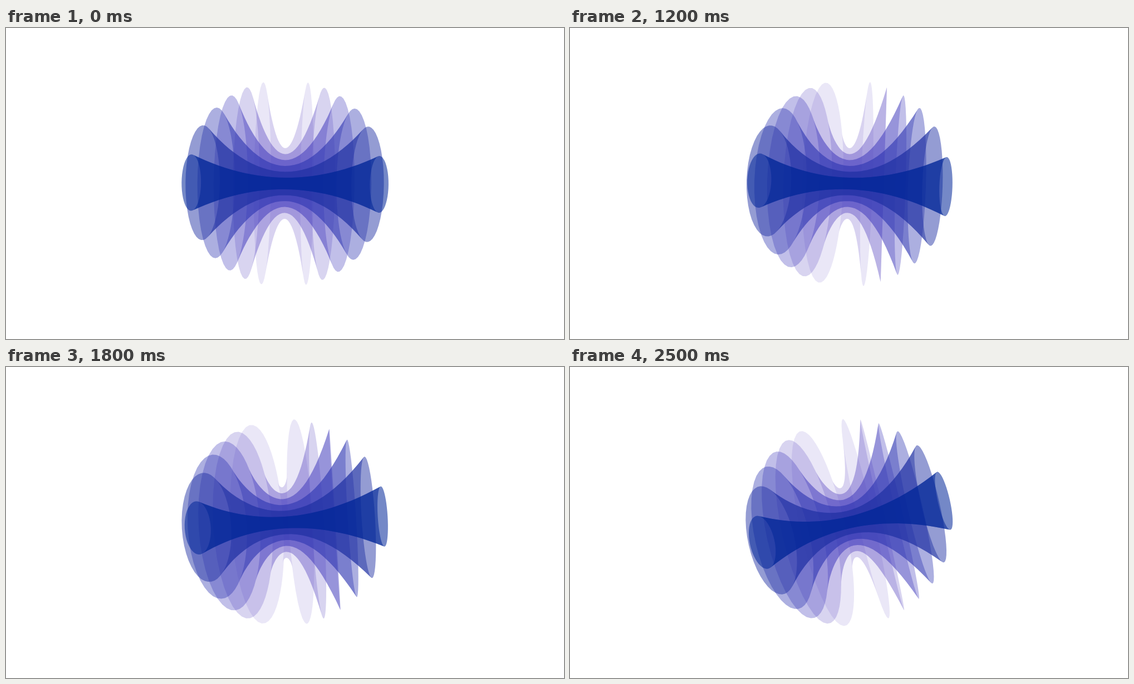
An HTML page with a canvas for the animation above (2.6 s loop, 1002x559 px).

```html
<!DOCTYPE html>
<html lang="en">
<head>
<meta charset="utf-8">
<title>Nested flared tubes</title>
<style>
  html, body { margin: 0; width: 100%; height: 100%; overflow: hidden; background: #fff; }
  canvas { display: block; width: 1002px; height: 559px; }
</style>
</head>
<body>
<canvas id="stage" width="1002" height="559"></canvas>
<script>
const ctx = document.getElementById('stage').getContext('2d');
const CENTER = { x: 501, y: 279.5 };
const CAMERA = 500, RADIUS = 174.5, NECK_STEP = 10.5;
const RINGS = 28, SIDES = 48;
const LOOP = 2600, STEP = 100;

// Outermost tube first; reach is the half length relative to the ball radius.
const TUBES = [
  { reach: .203, color: 'rgba(80,60,190,.12)' },
  { reach: .355, color: 'rgba(78,60,187,.22)' },
  { reach: .507, color: 'rgba(64,58,186,.32)' },
  { reach: .661, color: 'rgba(48,56,178,.40)' },
  { reach: .814, color: 'rgba(32,48,163,.48)' },
  { reach: .957, color: 'rgba(3,39,154,.55)' }
].map((tube, i, all) => ({ ...tube, neck: NECK_STEP * (all.length - i) }));

// Axis pose in degrees: roll in the picture plane, yaw of the right end toward the viewer.
const TIMES = [0, .4, .8, 1.2, 1.6, 2, 2.5];
const ROLL = [.55, 2.55, 3.1, 1.85, -1.25, -6.1, -12.9];
const YAW = [.5, 1.7, 4, 7.1, 9.7, 10.7, 8.2];

function curve(values) {
  const last = TIMES.length - 1;
  const chord = i => (values[i + 1] - values[i]) / (TIMES[i + 1] - TIMES[i]);
  const slopes = values.map((_, i) => {
    if (i === 0 || i === last) return 0;
    const before = TIMES[i] - TIMES[i - 1], after = TIMES[i + 1] - TIMES[i];
    return (chord(i - 1) * after + chord(i) * before) / (before + after);
  });
  slopes[0] = 2 * chord(0) - slopes[1];
  slopes[last] = 2 * chord(last - 1) - slopes[last - 1];

  return t => {
    let i = 0;
    while (i < last - 1 && t > TIMES[i + 1]) i++;
    const span = TIMES[i + 1] - TIMES[i], u = (t - TIMES[i]) / span, v = 1 - u;
    return v * v * (1 + 2 * u) * values[i] + u * u * (1 + 2 * v) * values[i + 1]
      + u * v * span * (v * slopes[i] - u * slopes[i + 1]);
  };
}

const rollAt = curve(ROLL), yawAt = curve(YAW);
const radians = degrees => degrees * Math.PI / 180;

function projector(roll, yaw) {
  const cr = Math.cos(roll), sr = Math.sin(roll);
  const cy = Math.cos(yaw), sy = Math.sin(yaw);
  return (along, up, depth) => {
    const x = along * cy - depth * sy;
    const scale = CAMERA / (CAMERA - along * sy - depth * cy);
    return [
      CENTER.x + (x * cr - up * sr) * scale,
      CENTER.y + (x * sr + up * cr) * scale
    ];
  };
}

function tubeMesh({ reach, neck }, project) {
  const half = reach * RADIUS;
  const rim = RADIUS * Math.sqrt(1 - reach * reach);
  return Array.from({ length: RINGS + 1 }, (_, i) => {
    const s = 2 * i / RINGS - 1;
    const r = neck + (rim - neck) * s * s;
    return Array.from({ length: SIDES }, (_, j) => {
      const a = 2 * Math.PI * j / SIDES;
      return project(half * s, r * Math.cos(a), r * Math.sin(a));
    });
  });
}

// Near and far sheets are separate paths, so each one tints its area once.
function drawTube(tube, project) {
  const mesh = tubeMesh(tube, project);
  const near = new Path2D(), far = new Path2D();
  for (let i = 0; i < RINGS; i++) {
    for (let j = 0; j < SIDES; j++) {
      const k = (j + 1) % SIDES;
      const a = mesh[i][j], b = mesh[i + 1][j], c = mesh[i + 1][k], d = mesh[i][k];
      const area = (c[0] - a[0]) * (d[1] - b[1]) - (c[1] - a[1]) * (d[0] - b[0]);
      const sheet = area > 0 ? near : far;
      sheet.moveTo(...a);
      sheet.lineTo(...b);
      sheet.lineTo(...c);
      sheet.lineTo(...d);
      sheet.closePath();
    }
  }
  ctx.fillStyle = tube.color;
  ctx.fill(far, 'nonzero');
  ctx.fill(near, 'nonzero');
}

function draw(ms) {
  const t = ms / 1000;
  const project = projector(radians(rollAt(t)), radians(yawAt(t)));
  ctx.fillStyle = '#fff';
  ctx.fillRect(0, 0, 1002, 559);
  TUBES.forEach(tube => drawTube(tube, project));
}

const start = performance.now();
let shown = -1;

function tick() {
  const elapsed = Math.max(0, performance.now() - start) % LOOP;
  const ms = Math.floor(elapsed / STEP) * STEP;
  if (ms !== shown) draw(shown = ms);
  requestAnimationFrame(tick);
}
tick();
</script>
</body>
</html>
```
